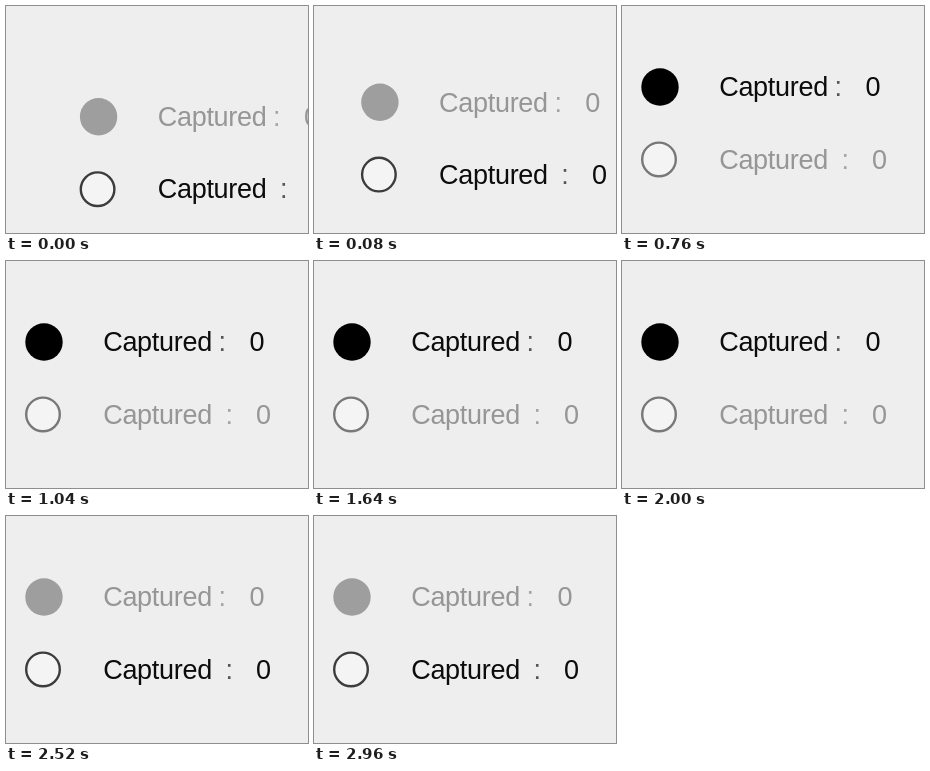
An HTML page that plays this animation: 302 px wide and 227 px high, repeating every 3 s.

```html
<!DOCTYPE html>
<html lang="en">
<head>
<meta charset="utf-8">
<style>
  html, body { margin: 0; width: 100%; height: 100%; overflow: hidden; background: #eee; }
  svg { display: block; width: 100%; height: 100%; }
  #panel { filter: blur(0.4px); }
  text { font: 27px "Liberation Sans", Arial, sans-serif; letter-spacing: -0.3px; fill: #0c0c0c; }
  .colon { fill: #555; }
  .dark circle { fill: #000; }
  .light circle { fill: #f4f4f4; stroke: #3c3c3c; stroke-width: 2.4; }
  .idle text { fill: #969696; }
  .idle .colon { fill: #a4a4a4; }
  .dark.idle circle { fill: #9e9e9e; }
  .light.idle circle { stroke: #787878; }
</style>
</head>
<body>
<svg viewBox="0 0 302 227">
  <g id="panel">
    <g id="dark" class="dark">
      <circle cx="38" cy="81" r="18.7"/>
      <text y="90.3"><tspan x="97.2">Captured</tspan><tspan x="212.5" class="colon">:</tspan><tspan x="243.4">0</tspan></text>
    </g>
    <g id="light" class="light">
      <circle cx="37" cy="153.4" r="16.8"/>
      <text y="162.5"><tspan x="97.2">Captured</tspan><tspan x="219.4" class="colon">:</tspan><tspan x="250">0</tspan></text>
    </g>
  </g>
</svg>
<script>
  const LOOP = 3000, PAN = 400, DARK_TURN = [680, 2440];
  const [panel, dark, light] = ["panel", "dark", "light"].map(id => document.getElementById(id));

  function draw() {
    const t = performance.now() % LOOP;
    const remaining = Math.max(0, 1 - t / PAN) ** 3;
    const darkTurn = t >= DARK_TURN[0] && t < DARK_TURN[1];
    panel.setAttribute("transform", `translate(${55 * remaining} ${30 * remaining})`);
    dark.classList.toggle("idle", !darkTurn);
    light.classList.toggle("idle", darkTurn);
    requestAnimationFrame(draw);
  }
  draw();
</script>
</body>
</html>
```
